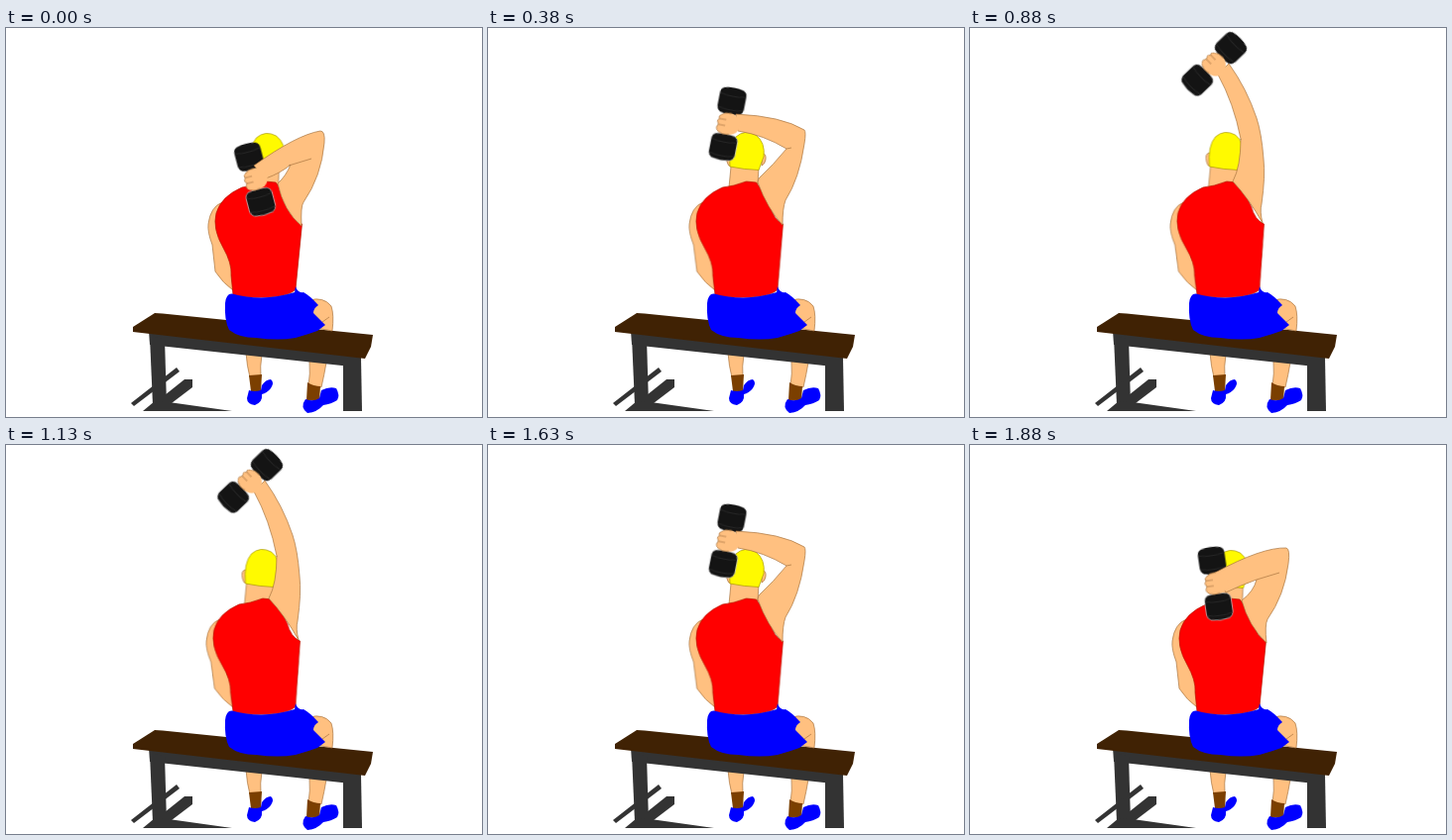
Write an HTML page without scripts that moves like this. It is 480 px wide and 393 px high and loops after 2.01 s.

```html
<!DOCTYPE html>
<html lang="en">
<head>
<meta charset="utf-8">
<title>Overhead triceps extension</title>
<style>
html, body { margin: 0; width: 100%; height: 100%; overflow: hidden; background: #fff; }
svg { display: block; width: 480px; height: 393px; }

.skin { fill: #ffc080; stroke: #a8743f; stroke-width: .7; }
.line { fill: none; stroke: #a8743f; stroke-width: .7; }
.blue { fill: #00f; }
.sock { fill: #7b3f00; }
.steel { fill: #333; }
.iron { fill: #141414; }

/* Poses run from --low (weight behind the neck) to --top (arm straight). */
.arm, .grip, .head, .torso {
  animation: 2010ms steps(2) -6ms infinite;
}
.arm { animation-name: bend; }
.grip, .head, .torso { animation-name: move; }

.arm {
  --low: path("M274 157Q280 185 298 200Q297 180 300 176Q318 150 321 116Q322 104 317 104Q293 108 250 139L262 152Q278 146 287 138Q282 150 274 157ZM285 139L308 132");
  --rise: path("M274 157Q281 183 299 200Q297 182 300 176Q317 152 321 120Q323 105 319 104Q295 103 247 129L258 149Q272 142 289 136Q286 148 274 157ZM289 136L312 129");
  --mid: path("M272 156Q282 183 297 199Q297 182 300 174Q314 152 319 117Q321 105 319 103Q296 89 250 87L252 104Q278 108 301 122Q288 138 273 152ZM301 122L306 121");
  --high: path("M268 156Q279 178 296 197Q296 185 297 176Q309 150 309 116Q310 103 308 101Q287 70 256 53L246 68Q276 85 287 113Q281 142 268 156ZM287 113L288 114");
  --near: path("M265 155Q281 172 295 197Q292 185 294 178Q298 150 296 132Q294 106 289 91Q279 61 261 36L250 47Q266 76 273 112Q273 140 265 155ZM273 112L273 113");
  --top: path("M265 155Q281 172 295 197Q292 185 294 178Q298 150 295 131Q293 105 288 90Q278 60 262 35L251 46Q266 75 272 112Q272 140 265 155ZM272 112L272 113");
}
.grip {
  --low: translate(251px, 153px) rotate(-14.6deg);
  --rise: translate(247.5px, 140px) rotate(-8.3deg);
  --mid: translate(241.5px, 97px) rotate(11deg);
  --high: translate(242.5px, 61.8px) rotate(27deg);
  --near: translate(246px, 36.5px) rotate(46deg);
  --top: translate(247px, 35.5px) rotate(48deg);
}
.head {
  --low: translate(4.5px, 1px);
  --rise: translate(4.5px, 1px);
  --mid: translate(2px, 0);
  --high: translate(0, 0);
  --near: translate(-.5px, 0);
  --top: translate(-.5px, 0);
}
.torso {
  transform-origin: 260px 268px;
  --low: skewX(0deg);
  --rise: skewX(0deg);
  --mid: skewX(.8deg);
  --high: skewX(1.2deg);
  --near: skewX(1.6deg);
  --top: skewX(1.7deg);
}

@keyframes bend {
  0% { d: var(--low); animation-timing-function: steps(1); }
  6.468% { d: var(--rise); }
  18.905% { d: var(--mid); }
  31.343% { d: var(--high); }
  43.781% { d: var(--near); animation-timing-function: steps(1); }
  49.751% { d: var(--top); animation-timing-function: steps(1); }
  56.219% { d: var(--near); }
  68.657% { d: var(--high); }
  81.095% { d: var(--mid); }
  93.532% { d: var(--rise); animation-timing-function: steps(1); }
  100% { d: var(--low); }
}
@keyframes move {
  0% { transform: var(--low); animation-timing-function: steps(1); }
  6.468% { transform: var(--rise); }
  18.905% { transform: var(--mid); }
  31.343% { transform: var(--high); }
  43.781% { transform: var(--near); animation-timing-function: steps(1); }
  49.751% { transform: var(--top); animation-timing-function: steps(1); }
  56.219% { transform: var(--near); }
  68.657% { transform: var(--high); }
  81.095% { transform: var(--mid); }
  93.532% { transform: var(--rise); animation-timing-function: steps(1); }
  100% { transform: var(--low); }
}
</style>
</head>
<body>
<svg viewBox="0 0 480 393">
  <defs>
    <g id="plate" transform="scale(1.08)">
      <path class="iron" d="M-9 -11.5Q0 -14 9 -11.5Q12.5 -10 12.5 -6L12.5 6Q12 10 9 11.5Q0 14 -9 11.5Q-12 10 -12.5 6L-12.5 -6Q-12.5 -10 -9 -11.5Z"/>
      <path d="M-12 -6Q0 -3 12 -6M-12 7Q0 10 12 7" fill="none" stroke="#292929" stroke-width=".8"/>
    </g>
  </defs>

  <g id="legs">
    <path class="skin" d="M242 328L258 330Q256 342 257 353L246 353Q243 342 242 328Z"/>
    <path class="sock" d="M245 351L258 350L257 367L247 367Z"/>
    <path class="blue" d="M245 366Q251 368 257 366L258 361Q262 355 267 355Q271 358 267 364Q263 369 258 370Q259 378 251 381Q243 380 243 374Z"/>
    <path class="skin" d="M306 336L323 338Q321 350 318 363L305 361Q307 350 306 336Z"/>
    <path class="sock" d="M304 358Q310 362 317 362L316 377L303 376Z"/>
    <path class="blue" d="M302 375Q310 378 316 374L318 366Q326 362 333 364Q337 371 334 376Q328 380 320 381Q314 388 304 389Q296 383 302 375Z"/>
  </g>

  <g id="bench">
    <g class="steel">
      <path d="M144 306L358 331L357 343L145 320Z"/>
      <path d="M145 312L160 314L162 381L148 381Z"/>
      <path d="M340 333L358 333L359 387L340 387Z"/>
      <path d="M138 387L150 377L164 378L228 387Z"/>
      <path d="M126 379L172 343L175 347L129 382Z"/>
      <path d="M160 371L180 355L188 355L188 363L167 379L160 379Z"/>
    </g>
    <path d="M128 302L150 288L158 288.5L370 310L368 322L362 334L128 307Z" fill="#402204"/>
  </g>

  <path class="skin" d="M306 275Q320 271 328 281Q331 290 329 306L318 304L306 298Z"/>
  <path class="line" d="M319 297L326 292"/>

  <path class="torso skin" d="M218 176Q206 181 204 198Q203 206 208 219L211 246Q219 258 229 265L227 235L214 186Z"/>
  <g class="head">
    <path class="skin" d="M274 126Q279 127 278 133Q277 138 274 139Z"/>
    <path class="skin" d="M242 126Q237 127 239 135Q240 140 243 140L241 161Q256 165 270 158L271 140Z"/>
    <path d="M242 140Q240 119 248 110Q257 102 268 108Q278 116 276 130L271 143.5Q256 143 242 140Z" fill="#fffa00" stroke="#a99a00" stroke-width=".7"/>
  </g>
  <path class="torso" d="M238 161Q217 170 212 187Q208 203 219 222Q228 238 227 250L229 270Q250 274 275 271Q288 269 292 264L298.5 198Q289 194 286 180Q279 164 272 156L262 155Q249 160 238 161Z" fill="#f00" stroke="#b51800" stroke-width=".7"/>
  <path class="blue" d="M228 268.500Q222 268 221 278Q220 295 225 305Q235 313 252 313Q275 316 292 313Q306 309 314 306L322 300L310 288Q310 283 315 280Q306 270 300 267Q294 268 292 261L291 267Q260 277 228 268.500Z"/>

  <g class="grip">
    <path d="M0 -16V16" stroke="#555" stroke-width="7"/>
    <use href="#plate" y="-23.5"/>
    <use href="#plate" y="23.5" stroke="#fff" stroke-width=".5"/>
  </g>
  <path class="arm skin" d="M274 157Q280 185 298 200Q297 180 300 176Q318 150 321 116Q322 104 317 104Q293 108 250 139L262 152Q278 146 287 138Q282 150 274 157ZM285 139L308 132"/>
  <g class="grip">
    <path d="M-8 -8Q-4 -12 4 -11Q12 -8 13 0Q12 8 5 10Q-3 12 -8 9Q-12 6 -9 2Q-12 -2 -9 -4Q-11 -6 -8 -8Z" fill="#ffc080"/>
    <path class="line" d="M2 -11Q-4 -12 -8 -8Q-11 -6 -9 -4Q-12 -2 -9 2Q-12 6 -8 9Q-3 12 3 10M-9 -4L-2 -4M-9 2L-2 2"/>
  </g>
</svg>
</body>
</html>
```
